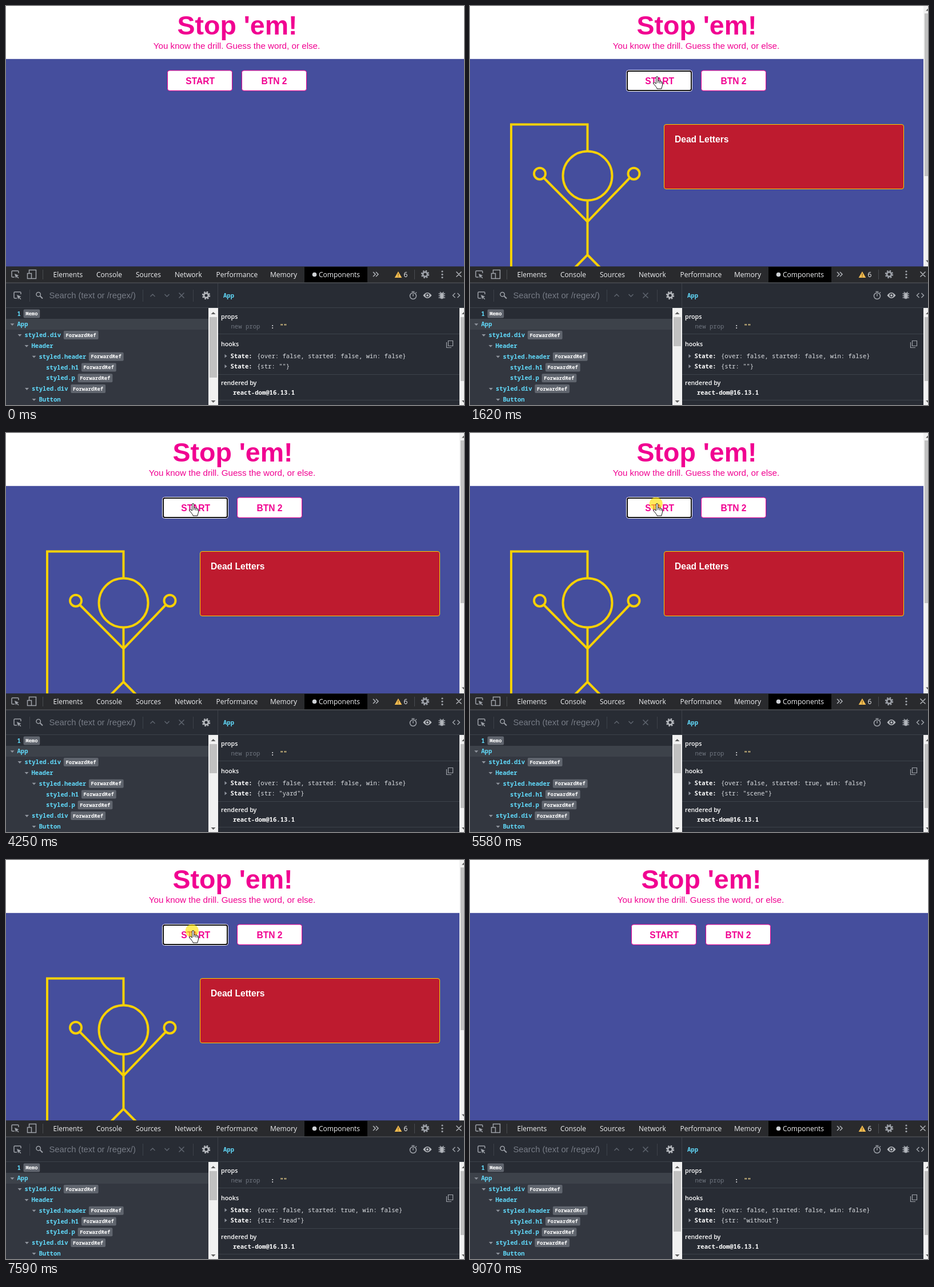
Write an HTML page that moves like this. It is 801 px wide and 699 px high and loops after 9.14 s.

```html
<!DOCTYPE html>
<html lang="en">
<head>
<meta charset="utf-8">
<title>Word game with component inspector</title>
<style>
  html, body { margin: 0; width: 100%; height: 100%; overflow: hidden; background: #454e9d; }
  svg { display: block; width: 100vw; height: 100vh; }
  text { white-space: pre; }
  .page { font-family: "Liberation Sans", Arial, sans-serif; fill: #f10091; text-anchor: middle; }
  .bold { font-weight: 700; font-size: 15.6px; }
  .ui { font-family: "Open Sans", "Noto Sans", sans-serif; font-size: 12px; font-weight: 500; fill: #f0f1f3; }
  .small { font-size: 10.7px; font-weight: 600; fill: #fff; }
  .mono { font-family: "Noto Sans Mono", "DejaVu Sans Mono", monospace; font-size: 10.6px; font-weight: 500; fill: #dcdfe3; }
  .b { font-weight: 700; fill: #fff; }
  .name { font-weight: 600; fill: #61dafb; }
  .badge { font-size: 8.9px; font-weight: 700; fill: #fff; }
  .yellow { fill: none; stroke: #f9d100; stroke-width: 4; }
  .line { fill: none; stroke: #3d424a; }
  .icon { fill: none; stroke: #9da1a8; stroke-width: 1.5; }
  .dim { stroke: #5d636d; }
  .track { fill: #f1f1f1; }
  .thumb { fill: #c1c1c1; }
  .arrow { fill: #606060; }
</style>
</head>
<body>
<svg viewBox="0 0 801 699" preserveAspectRatio="none">
  <defs>
    <g id="gear">
      <circle r="3.900" fill="none" stroke-width="2.800"/>
      <circle r="6" fill="none" stroke-width="2.400" stroke-dasharray="2.500 2.212"/>
    </g>
    <g id="pick">
      <path d="M-1 5H-4.500Q-6 5-6 3.500V-4.500Q-6-6-4.500-6H4.500Q6-6 6-4.500V-2"/>
      <path d="M-1-1L6.500 2L3.600 3.200L6.500 6.200L5.400 7.200L2.500 4.300L1.300 7Z" fill="#9da1a8" stroke="none"/>
    </g>
  </defs>

  <rect width="801" height="457" fill="#454e9d"/>
  <rect width="801" height="92.800" fill="#fff"/>
  <g id="page" class="page">
    <text x="404.5" y="50" font-size="46.500" font-weight="700">Stop 'em!</text>
    <text x="403.5" y="75" font-size="15.200">You know the drill. Guess the word, or else.</text>
    <rect x="282.5" y="113" width="113" height="35.300" rx="3.500" fill="#fff" stroke="#f10091"/>
    <rect x="412.5" y="113" width="113" height="35.300" rx="3.500" fill="#fff" stroke="#f10091"/>
    <g id="ring" fill="none">
      <rect x="281.5" y="112.500" width="115" height="37" rx="4" stroke="#fff"/>
      <rect x="283" y="114" width="112" height="34" rx="3" stroke="#101010" stroke-width="2"/>
    </g>
    <text class="bold" x="339.7" y="136.800">START</text>
    <text class="bold" x="469" y="136.800">BTN 2</text>
  </g>

  <g id="game">
    <g class="yellow">
      <path d="M72 470V207.500H205.500V254M205.500 341V436L175 467M205.500 436L236 467M129.500 301.500L205.500 378L279 301.500"/>
      <circle cx="205.500" cy="297.500" r="43"/>
      <circle cx="122" cy="293.700" r="10"/>
      <circle cx="286.500" cy="293.700" r="10"/>
    </g>
    <rect x="339.500" y="207.500" width="419" height="113" rx="3.500" fill="#be1b2f" stroke="#f9d100"/>
    <text class="page bold" x="358" y="239" style="fill:#fff;text-anchor:start">Dead Letters</text>
    <rect class="track" x="793" width="8" height="457"/>
    <rect class="thumb" x="795" y="13" width="6" height="285"/>
    <path class="arrow" d="M797 8.500L801.500 4V8.500ZM797 445.500H801.500V450Z"/>
  </g>

  <!-- inspector: tab bar -->
  <rect y="456.500" width="801" height="243" fill="#282c34"/>
  <rect y="456.500" width="801" height="28.500" fill="#292a2d"/>
  <path d="M0 485H801" stroke="#4a4d52" stroke-width="1.500"/>
  <rect x="522" y="457" width="110" height="27" fill="#000"/>
  <circle cx="539.500" cy="470.500" r="3.800" fill="#cfd2d6"/>
  <g id="tabs" class="ui"></g>
  <path d="M64.500 462V479M714.500 462V479" stroke="#494c50"/>
  <g class="icon">
    <use href="#pick" x="16" y="470"/>
    <path d="M40.500 468V462.500H52.500V477.500H45M37.500 468.500H44.500V477.500H37.500Z"/>
    <path d="M642 466L646 470L642 474M647 466L651 470L647 474M787.500 465.500L796.500 474.500M796.500 465.500L787.500 474.500" stroke="#b0b3b8"/>
    <use href="#gear" x="733" y="470"/>
  </g>
  <path d="M686 465L692.300 476H679.700Z" fill="#f5bd51"/>
  <path d="M686 468.500V472.500M686 473.500V475" stroke="#7a5a1c" stroke-width="1.200"/>
  <g fill="#9da1a8">
    <circle cx="763" cy="465" r="1.600"/><circle cx="763" cy="470.300" r="1.600"/><circle cx="763" cy="475.600" r="1.600"/>
  </g>

  <!-- component tree -->
  <rect y="548" width="354" height="151" fill="#333740"/>
  <rect y="548" width="354" height="19" fill="#3d424a"/>
  <path class="line" d="M0 528.500H801M370.500 486V529M41.500 497V518M239.500 497V518M327.500 497V518"/>
  <text class="page" x="75.500" y="512" font-size="14.800" style="fill:#777c86;text-anchor:start">Search (text or /regex/)</text>
  <g class="icon">
    <use href="#pick" x="20" y="507"/>
    <circle cx="56.700" cy="505.200" r="3.700"/>
    <path d="M59.500 508L64 512.500" stroke-width="2"/>
    <path class="dim" d="M252.500 509L256.500 505L260.500 509M277.500 505L281.500 509L285.500 505M302.500 502.500L311.500 511.500M311.500 502.500L302.500 511.500"/>
    <use href="#gear" x="350" y="507" stroke="#b5b8bd"/>
  </g>
  <g id="tree" class="mono"></g>
  <rect class="track" x="354" y="529" width="17" height="170"/>
  <rect id="treeThumb" class="thumb" x="356" y="545" width="13" height="106"/>
  <path class="arrow" d="M358.500 540L362.500 536L366.500 540ZM358.500 691H366.500L362.500 695Z"/>

  <!-- details panel -->
  <text class="mono name" x="380" y="511">App</text>
  <g class="icon">
    <circle cx="712" cy="508" r="5.500"/>
    <path d="M709.500 500.500H714.500M712 504.500V508.500M716.500 503L718 501.500"/>
    <path d="M729.500 507Q737 497 744.500 507Q737 517 729.500 507Z" fill="#b5b8bd" stroke="none"/>
    <circle cx="737" cy="507" r="2.700" fill="#b5b8bd" stroke="#282c34"/>
    <path d="M756.500 504H768M756.500 507.500H768M756.500 511H768M759 501L761 503.500M765.500 501L763.500 503.500"/>
    <rect x="759.500" y="503" width="5.500" height="9.500" rx="2.700" fill="#b5b8bd"/>
    <path d="M785.500 503L781.500 507L785.500 511M789.500 503L793.500 507L789.500 511"/>
    <path d="M773.500 586.500H781.500V595.500H773.500ZM770.500 589V598.500H779" stroke-width="1.200"/>
  </g>
  <path class="line" d="M371 574.500H793M371 645.500H793M371 690.500H793"/>
  <g class="ui">
    <text class="small" x="376" y="548">props</text>
    <text class="small" x="376" y="596">hooks</text>
    <text class="small" x="376" y="664">rendered by</text>
  </g>
  <g class="mono">
    <text x="393.500" y="565" style="fill:#6f757f">new prop</text>
    <text class="b" x="463" y="565">:</text>
    <text x="479" y="565" style="fill:#e9cf8a;font-weight:700">""</text>
    <path d="M382.500 610L386.500 613.300L382.500 616.600ZM382.500 628L386.500 631.300L382.500 634.600Z" fill="#8f949d"/>
    <text class="b" x="392.500" y="617">State:</text>
    <text class="b" x="392.500" y="635">State:</text>
    <text id="flags" x="439" y="617"></text>
    <text id="word" x="439" y="635"></text>
    <text class="b" x="397" y="681">react-dom@16.13.1</text>
  </g>
  <rect class="track" x="793" y="529" width="8" height="170"/>
  <rect class="thumb" x="795" y="545" width="6" height="112"/>
  <path class="arrow" d="M797 540L801 536V540ZM797 691H801V695Z"/>

  <circle id="press" cx="325.300" cy="124" r="11.500" fill="#ffe100" fill-opacity=".64"/>
  <g id="cursor" stroke="#111" fill="#fff" stroke-linejoin="round">
    <g id="hand" transform="translate(-7.200 0)">
      <path d="M5.500 13V2.200a1.600 1.600 0 0 1 3.200 0V8.500c.5-1 3-.8 3 .6c.5-.8 2.600-.5 2.600.8c.6-.5 2.200-.2 2.200 1.300V15c0 3-1.500 4-1.500 7H7C7 19.500 4 17.500 1 12.800c-1-2 1-2.600 2-1.500z"/>
      <path d="M8.700 8V12M11.700 9.500V12.500M14.300 10.500V13" fill="none"/>
    </g>
    <path id="pointer" d="M.5.500V16L4 12.700L6.400 18.300L8.800 17.200L6.500 11.700H11.500Z"/>
  </g>
</svg>

<script>
const LOOP = 9140;
const $ = id => document.getElementById(id);
const show = (id, on) => $(id).setAttribute("display", on ? "inline" : "none");

function add(parent, tag, attrs, text = "") {
  const el = document.createElementNS("http://www.w3.org/2000/svg", tag);
  for (const key in attrs) el.setAttribute(key, attrs[key]);
  el.textContent = text;
  parent.append(el);
}

const tabs = [["Elements", 82.5], ["Console", 158], ["Sources", 227], ["Network", 295],
  ["Performance", 367.5], ["Memory", 462], ["Components", 547], ["6", 695.5]];
for (const [label, x] of tabs) add($("tabs"), "text", { x, y: 475 }, label);

// name, x, badge, expandable
const rows = [["1", 19.5, "Memo", 0], ["App", 19.5, "", 1], ["styled.div", 32.5, "ForwardRef", 1],
  ["Header", 44.5, "", 1], ["styled.header", 57.5, "ForwardRef", 1], ["styled.h1", 70, "ForwardRef", 0],
  ["styled.p", 70, "ForwardRef", 0], ["styled.div", 45, "ForwardRef", 1], ["Button", 57.5, "", 1]];
rows.forEach(([name, x, badge, open], i) => {
  const y = 539 + i * 18.8, tree = $("tree");
  add(tree, "text", { x, y: y + 3.6, class: "name" }, name);
  if (open) add(tree, "path", { d: `M${x - 12} ${y - 1.5}h7l-3.5 3.8z`, fill: "#8f949d" });
  if (!badge) return;
  const bx = x + name.length * 6.36 + 4.7;
  add(tree, "rect", { x: bx, y: y - 7.5, width: badge.length * 5.35 + 7.3, height: 15, rx: 2, fill: "#60656e" });
  add(tree, "text", { x: bx + 3.6, y: y + 3.2, class: "badge" }, badge);
});

// press, page toggles, inspector catches up, new word
const clicks = [[1530, 1620, 2000, "mouse"], [2860, 2940, 3090, "yard"], [4170, 4250, 5030, "scene"],
  [5580, 5650, 6050, "soldier"], [6660, 6740, 7060, "read"], [7590, 7670, 8050, "without"]];

// time, x, y of the cursor tip
const path = [[230, 750, 664], [540, 480, 290], [770, 330, 142], [844, 301, 120], [920, 307, 113],
  [993, 307, 113], [1300, 327.2, 123], [7823, 327.2, 123], [8130, 375, 205], [8380, 540, 440], [8540, 722, 690]];
const bursts = [[230, 920, 10], [1070, 1300, 4], [7900, 8610, 10]];

function stepped(t) {
  let held = 0;
  for (const [from, to, n] of bursts) {
    if (t < from) break;
    const step = (to - from) / (n - 1);
    held = from + step * Math.min(n - 1, Math.floor((t - from) / step + 1e-6));
  }
  return held;
}

function cursorAt(t) {
  const i = path.findIndex(p => p[0] >= t);
  if (i < 1) return path[i < 0 ? path.length - 1 : 0].slice(1);
  const [a, b] = [path[i - 1], path[i]];
  const k = (t - a[0]) / (b[0] - a[0]);
  return [a[1] + (b[1] - a[1]) * k, a[2] + (b[2] - a[2]) * k];
}

function draw(t) {
  const toggles = clicks.filter(c => t >= c[1]).length;
  const updates = clicks.filter(c => t >= c[2]).length;
  const playing = toggles % 2 === 1;
  show("game", playing);
  show("ring", t >= 1530 && t < 9070);
  show("press", clicks.some(c => t >= c[0] && t < c[1]));
  $("page").setAttribute("transform", `translate(${playing ? -8 : 0} 0)`);
  $("treeThumb").setAttribute("height", playing ? 51 : 106);
  $("flags").textContent = `{over: false, started: ${updates % 2 === 1}, win: false}`;
  $("word").textContent = `{str: "${updates ? clicks[updates - 1][3] : ""}"}`;

  const [x, y] = cursorAt(stepped(t));
  const onButton = x > 274 && x < 396 && y >= 113 && y < 149;
  show("cursor", t >= 230 && t < 8610);
  show("hand", onButton);
  show("pointer", !onButton);
  $("cursor").setAttribute("transform", `translate(${x} ${y})`);
}

const start = performance.now();
function tick() {
  draw((performance.now() - start) % LOOP);
  requestAnimationFrame(tick);
}
tick();
</script>
</body>
</html>
```
